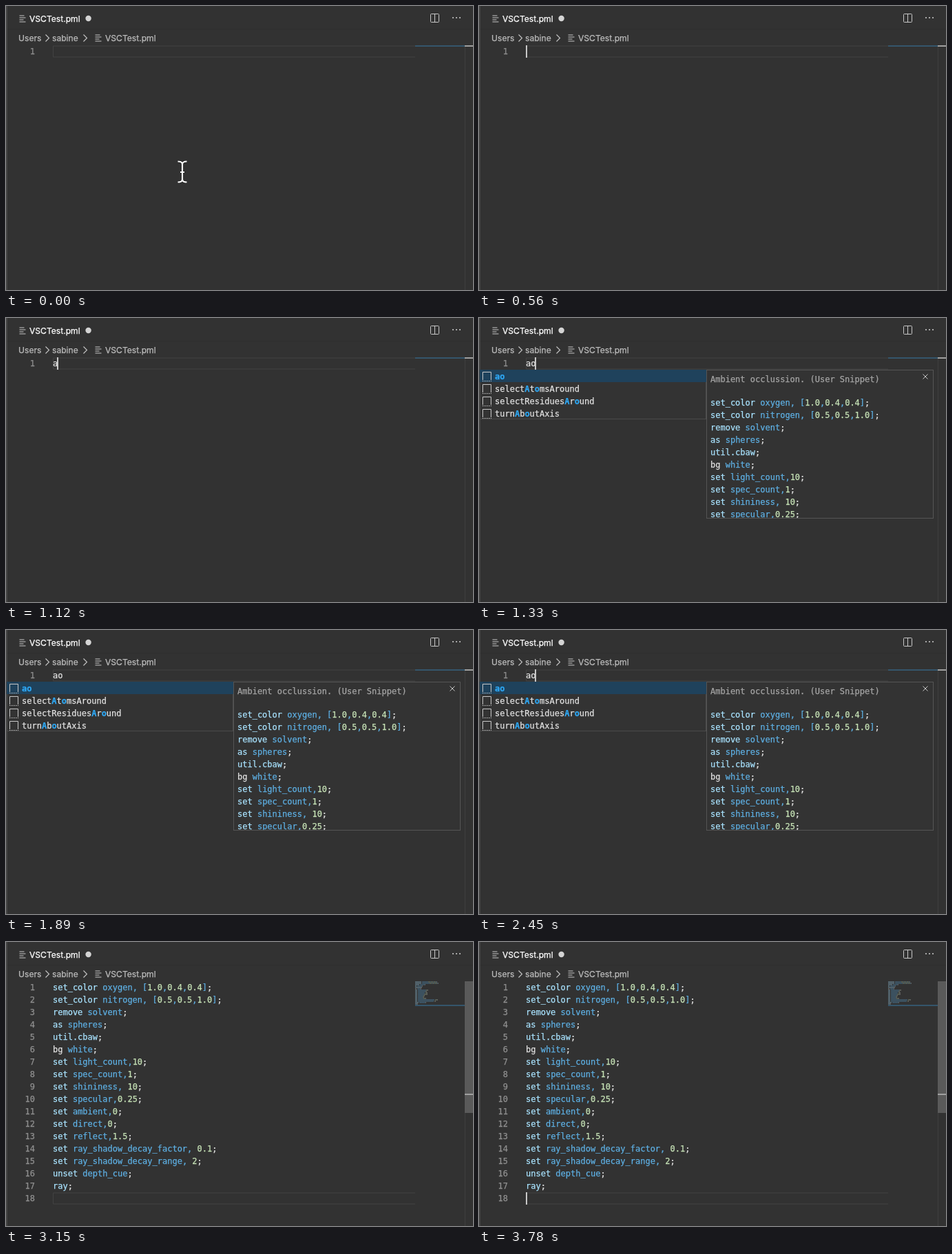
An HTML page that plays this animation: 678x412 px, repeating every 3850 ms.

```html
<!DOCTYPE html>
<html lang="en">
<head>
<meta charset="utf-8">
<title>Snippet completion</title>
<style>
  html, body { margin: 0; width: 100%; height: 100%; overflow: hidden; background: #323232; }
  svg { display: block; width: 678px; height: 412px; }
  text { white-space: pre; }
  text, tspan { fill: currentColor; stroke: currentColor; stroke-width: .25px; }
  .ui { font: 12.1px Inter, "Open Sans", sans-serif; color: #bcbcbc; }
  .tab { color: #fff; }
  .code { font: 12px "DejaVu Sans Mono", "Liberation Mono", monospace; color: #e4e4e4; }
  .num { color: #8f8f8f; text-anchor: end; }
  .dim { color: #a6a6a6; }
  .cmd { color: #a9e3ff; }
  .arg { color: #5eb0e4; }
  .val { color: #c6e2b6; }
  .hit { color: #2ea8f5; font-weight: bold; }
  .line { fill: none; stroke: #c8c8c8; }
</style>
</head>
<body>
<svg id="stage" viewBox="0 0 678 412"></svg>
<script>
const LOOP = 3850;
const snippet = [
  'set_color oxygen, [1.0,0.4,0.4];',
  'set_color nitrogen, [0.5,0.5,1.0];',
  'remove solvent;',
  'as spheres;',
  'util.cbaw;',
  'bg white;',
  'set light_count,10;',
  'set spec_count,1;',
  'set shininess, 10;',
  'set specular,0.25;',
  'set ambient,0;',
  'set direct,0;',
  'set reflect,1.5;',
  'set ray_shadow_decay_factor, 0.1;',
  'set ray_shadow_decay_range, 2;',
  'unset depth_cue;',
  'ray;'
];
// Asterisks enclose the matched letters
const choices = ['*ao*', 'select*A*t*o*msAround', 'selectResidues*A*r*o*und', 'turn*A*b*o*utAxis'];

const rect = (x, y, w, h, fill, extra = '') =>
  `<rect x="${x}" y="${y}" width="${w}" height="${h}" fill="${fill}" ${extra}/>`;
const text = (x, y, body, cls = 'code') => `<text x="${x}" y="${y}" class="${cls}">${body}</text>`;
const path = (d, extra = '') => `<path class="line" d="${d}" ${extra}/>`;
const group = (id, body) => `<g id="${id}">${body}</g>`;
const span = (cls, s) => `<tspan class="${cls}">${s}</tspan>`;

function kind(token, first) {
  if (first) return token === 'bg' ? '' : 'cmd';
  if (token === ';') return '';
  return /^\d/.test(token) ? 'val' : 'arg';
}
const tokens = s => s.match(/\d+(\.\d+)?|[a-z_.]+|;|[^a-z\d;]+/g);
const highlight = s => tokens(s).map((t, i) => span(kind(t, i === 0), t)).join('');
const codeRows = (x, y, rows) => rows.map((s, i) => text(x, y + 18 * i, highlight(s))).join('');
const numbers = (from, to) => {
  let out = '';
  for (let n = from; n <= to; n++) out += text(42, 52 + 18 * n, n, 'code num');
  return out;
};
const fileIcon = (x, y) => path(
  `M${x} ${y}h7M${x} ${y + 3}h9M${x} ${y + 6}h6M${x} ${y + 9}h9`, 'stroke-width="1.2"');
const chevron = x => path(`M${x} 41.5l5 5l-5 5`, 'stroke-width="1.1"');
const lineBox = y => `<path d="M594 ${y}H68.5v16H594" fill="none" stroke="#424242"/>`;

function frame() {
  return rect(0, 0, 678, 412, '#323232') +
    rect(0, 0, 2, 412, '#464646') +
    rect(2, 33, 676, 1, '#2e2e2e') +
    fileIcon(19.5, 14) + text(34, 22.5, 'VSCTest.pml', 'ui tab') +
    '<circle cx="119.6" cy="18" r="4.2" fill="#d4d4d4"/>' +
    '<rect class="line" x="616.5" y="11.5" width="12" height="12" rx="1"/>' + path('M622.5 11.5v12') +
    [649, 654, 659].map(x => `<circle cx="${x}" cy="17" r="1.1" fill="#c5c5c5"/>`).join('') +
    text(18, 51, 'Users', 'ui') + chevron(57.5) +
    text(67, 51, 'sabine', 'ui') + chevron(112.5) +
    fileIcon(129.5, 42) + text(144, 51, 'VSCTest.pml', 'ui') +
    rect(666, 57, 1, 355, '#3f3f3f');
}

function popup() {
  const list = choices.map((s, i) => {
    const y = 75 + 18 * i;
    const label = s.split('*').map((p, k) => k % 2 ? span('hit', p) : p).join('');
    return path(`M5.5 ${y + 15}V${y + 3.5}H17.5V${y + 15}`) +
      path(`M5 ${y + 16.5}H18`, 'stroke-dasharray="1.5 1.5"') +
      text(23, y + 14, label);
  }).join('');
  return '<rect x="1.5" y="75.5" width="328" height="71" fill="#333" stroke="#4b4b4b"/>' +
    rect(1, 75, 329, 18, '#1f425c') + `<g clip-path="url(#listClip)">${list}</g>`;
}

function details() {
  return '<rect x="330.5" y="75.5" width="329" height="215" fill="#333" stroke="#555"/>' +
    text(336, 93, 'Ambient occlussion. (User Snippet)', 'code dim') +
    path('M644.5 81.5l7 7m0-7l-7 7') +
    `<g clip-path="url(#docClip)">${codeRows(336, 127, snippet.slice(0, 10))}</g>`;
}

function minimap() {
  const fills = { cmd: '#7aa0b2', arg: '#4a7b9a', val: '#81917a', '': '#929292' };
  return snippet.map((s, row) => {
    let x = 594;
    return tokens(s).map((t, i) => {
      const w = t.trim().length;
      const bar = w ? rect(x + t.length - t.trimStart().length, 57.3 + 2 * row, w, 1.2,
        fills[kind(t, i === 0)], 'opacity=".72"') : '';
      x += t.length;
      return bar;
    }).join('');
  }).join('');
}

const beam = 'M249.5 225.5C253.5 225.5 256 226 256 230V251C256 255 253.5 255.5 249.5 255.5' +
  'M262.5 225.5C258.5 225.5 256 226 256 230M256 251C256 255 258.5 255.5 262.5 255.5M253 241H259';

const stage = document.getElementById('stage');
stage.innerHTML =
  '<defs><clipPath id="listClip"><path d="M2 75H329V146H2z"/></clipPath>' +
  '<clipPath id="docClip"><path d="M331 76H659V290H331z"/></clipPath></defs>' +
  frame() +
  group('empty', numbers(1, 1) + lineBox(58) + rect(594, 57, 72, 2, '#35566c') +
    rect(666, 57, 12, 2, '#a0a0a0')) +
  '<text id="typed" x="68" y="70" class="code"></text>' +
  group('filled', numbers(1, 18) + codeRows(68, 70, snippet) + lineBox(364) + minimap() +
    rect(594, 91, 72, 2, '#35566c')) +
  group('slider', rect(666, 57, 12, 191, '#5a5a5a')) +
  group('mark', rect(666, 220, 12, 2, '#a0a0a0')) +
  group('popup', popup()) +
  group('details', details()) +
  rect(68, 57, 2, 18, '#c8c8c8', 'id="caret"') +
  group('pointer',
    `<path d="${beam}" fill="none" stroke="#222" stroke-width="3.4"/>` +
    `<path d="${beam}" fill="none" stroke="#fff" stroke-width="2.2"/>`);

const $ = id => document.getElementById(id);
const show = (id, on) => { $(id).style.display = on ? '' : 'none'; };
const caretOn = [[350, 840], [1120, 1890], [2380, 3010], [3500, LOOP]];

function draw(t) {
  const done = t >= 2520;
  const typed = done || t < 1120 ? '' : t < 1260 ? 'a' : 'ao';
  show('pointer', t < 560);
  show('empty', !done);
  show('filled', done);
  show('mark', done);
  show('popup', t >= 1260 && !done);
  show('details', t >= 1330 && !done);
  show('slider', done);
  $('slider').style.opacity = Math.min(1, 0.25 + Math.max(0, t - 2520) / 190);
  $('typed').textContent = typed;
  show('caret', caretOn.some(([a, b]) => t >= a && t < b));
  $('caret').setAttribute('x', 68 + Math.floor(7.22 * typed.length) - (typed ? 1 : 0));
  $('caret').setAttribute('y', done ? 363 : 57);
}

const start = performance.now();
function tick() {
  draw((performance.now() - start) % LOOP);
  requestAnimationFrame(tick);
}
draw(0);
requestAnimationFrame(tick);
</script>
</body>
</html>
```
